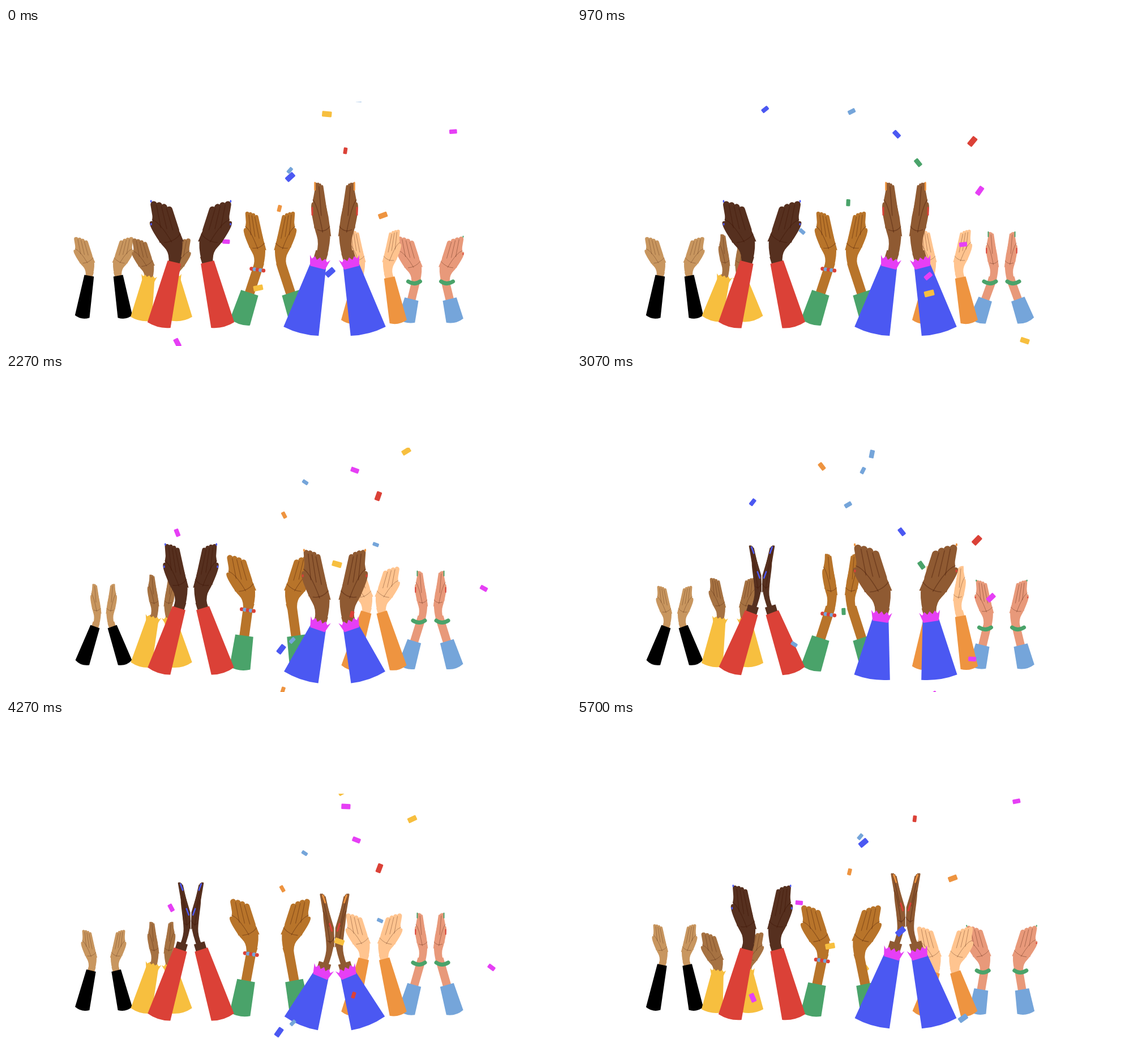
These frames come from a looping animation (998 px wide and 561 px high, 5730 ms). An HTML page with a canvas:

```html
<!DOCTYPE html>
<html lang="en">
<head>
<meta charset="utf-8">
<title>Clapping hands</title>
<style>
html, body { margin: 0; overflow: hidden; background: #fff; }
canvas { display: block; }
</style>
</head>
<body>
<canvas id="stage" width="998" height="561"></canvas>
<script>
const ctx = document.getElementById('stage').getContext('2d');
const LOOP = 5730, CYCLE = 24, CONFETTI_TOP = 130;
const C = {
  black: '#000', yellow: '#f7bf3f', red: '#db4137', green: '#4aa36a', blue: '#4b58f2',
  orange: '#ee9440', sky: '#75a5da', pink: '#e63ff5'
};

// A clap has six poses: 0 touches, 3 is widest. Each rule gives the pose for a step of the cycle.
const quick = start => n => (n + start) % 6;
const slow = n => Math.floor(4.2 + 0.75 * n) % 6;
const uneven = n => Math.floor(3.9 + 0.75 * n - 2 * Math.sin(Math.PI * n / CYCLE)) % 6;

// base: sleeve bottom; cover: share of the forearm in the sleeve; reach: sideways swing;
// wrist height bobs around `mid` by `bob`, lowest at step `low`.
const pairs = [
  { skin: '#c8965f', sleeve: C.black, centre: 172.5, size: 75, base: [134.5, 510], hem: 26, top: 17, cover: 1,
    pose: quick(3), reach: 14, mid: 437, bob: 10, low: 3 },
  { skin: '#a67242', sleeve: C.yellow, centre: 274.5, size: 80, base: [238.5, 514], hem: 38, top: 22, cover: 0.98,
    pose: slow, reach: 14, mid: 442, bob: 8, low: -2.5, frill: C.yellow },
  { skin: '#e8997a', sleeve: C.sky, centre: 750, size: 89, base: [707, 517], hem: 31, top: 25, cover: 0.57,
    pose: slow, reach: 17, mid: 437, bob: 14, low: 1, nails: [C.green, C.red], band: true },
  { skin: '#ffc48f', sleeve: C.orange, centre: 650, size: 88, base: [607, 519], hem: 31, top: 19, cover: 1,
    pose: quick(5), gap: 18, reach: -18, mid: 433, bob: 13, low: -1.9 },
  { skin: '#b8742a', sleeve: C.green, centre: 466.5, size: 104, base: [413, 520], hem: 37, top: 32, cover: 0.55,
    pose: quick(5), reach: 23, mid: 416, bob: 8, low: 0.5, beads: true },
  { skin: '#56301f', sleeve: C.red, centre: 326.5, size: 118, base: [270, 525], hem: 42, top: 24, cover: 1,
    pose: uneven, reach: 11, mid: 405, bob: 16, low: 2, nails: [C.blue, C.blue] },
  { skin: '#8f5a32', sleeve: C.blue, centre: 580.5, size: 135, base: [521, 536], hem: 64, top: 29, cover: 0.91,
    pose: quick(1), reach: 22, mid: 424, bob: 18, low: 5, nails: [C.orange, C.red], frill: C.pink }
];

// Left hand key points in hundredths of its height: [x, y] seen from the side, [x, y] fully open.
const HAND = {
  wristL: [-8, 6, -8, 6], heelL: [0, -22, -9, -15], thumbBase: [-6, -42, -23, -28],
  thumbTip: [-10, -70, -41, -57], notch: [-7, -79, -35, -62], tipL: [-4, -101, -37, -91],
  tipR: [5, -97, -4, -80], knuckle: [12, -56, 4, -53], heelR: [15, -30, 14, -31], wristR: [8, 6, 8, 6]
};

let seed = 11;
function random() {
  seed = (seed * 16807) % 2147483647;
  return seed / 2147483647;
}
const confetti = Array.from({ length: 36 }, (_, i, all = 36) => {
  const x = 520 + (random() + random() - 1) * 320;
  return {
    x, birth: (i + random()) * CYCLE / all, drift: (x - 520) * 0.04 + random() * 8 - 4,
    color: Object.values(C)[1 + Math.floor(random() * 7)],
    size: 11 + random() * 7, angle: random() * 180, behind: i % 3 === 0
  };
});

const mix = (a, b, f) => a.map((v, i) => v + (b[i] - v) * f);

function line(points, color, width, cap = 'round') {
  ctx.beginPath();
  points.forEach(p => ctx.lineTo(...p));
  ctx.strokeStyle = color;
  ctx.lineWidth = width;
  ctx.lineCap = cap;
  ctx.stroke();
}

function curve(from, bend, to, color, width) {
  ctx.beginPath();
  ctx.moveTo(...from);
  ctx.quadraticCurveTo(...bend, ...to);
  ctx.strokeStyle = color;
  ctx.lineWidth = width;
  ctx.lineCap = 'round';
  ctx.stroke();
}

function fill(points, color, smooth) {
  ctx.beginPath();
  points.forEach((p, i) => {
    if (smooth) ctx.quadraticCurveTo(...p, ...mix(p, points[(i + 1) % points.length], 0.5));
    else ctx.lineTo(...p);
  });
  ctx.fillStyle = color;
  ctx.fill();
}

// open: 0 side view to 1 palm view; touch: 1 when the palms meet and the hand bends outwards.
function handPoints([x, y], size, open, touch) {
  const place = ([sx, sy, ox, oy]) => {
    const [px, py] = mix([sx, sy], [ox, oy], open);
    const bent = px * (1 - 0.45 * touch) + 8.5 * touch * Math.sin(-py / 100 * Math.PI);
    return [x + bent * size / 100, y + py * size / 100];
  };
  return Object.fromEntries(Object.entries(HAND).map(([name, key]) => [name, place(key)]));
}

function drawHand({ skin, size, nails }, wrist, open, touch) {
  const p = handPoints(wrist, size, open, touch);
  const crease = 'rgba(60,18,0,.36)', thin = size * 0.011;
  const width = Math.hypot(p.tipR[0] - p.tipL[0], p.tipR[1] - p.tipL[1]) / 3.4;
  const finger = (f, drop) => {
    const [tx, ty] = mix(p.tipL, p.tipR, f);
    const root = mix(mix(p.notch, p.knuckle, f), mix(p.thumbBase, p.heelR, f), 0.3);
    return [[tx, ty + drop - Math.sin(f * Math.PI) * size * 0.02], root];
  };
  const tips = [0.13, 0.38, 0.62, 0.87].map(f => finger(f, width / 2));
  fill([p.wristL, p.heelL, p.thumbBase, p.thumbTip, p.notch, p.knuckle, p.heelR, p.wristR], skin, true);
  fill([p.thumbBase, p.notch, tips[0][0], tips[3][0], p.knuckle, p.heelR], skin);
  tips.forEach(t => line(t, skin, width));

  for (const f of open > 0.3 ? [0.26, 0.5, 0.74] : [0.5]) line(finger(f, size * 0.05), crease, thin);
  curve(p.notch, mix(p.notch, p.knuckle, 0.3), mix(p.thumbBase, p.heelR, 0.5), crease, thin);
  curve(mix(p.thumbBase, p.heelR, 0.2), mix(p.thumbBase, p.heelR, 0.6), mix(p.knuckle, p.heelR, 0.5), crease, thin);

  if (!nails) return;
  const length = size * (0.015 + 0.09 * Math.max(0, 1 - 2 * open));
  const nail = ([x, y], color) => line([[x, y], [x + touch * 4, y + length]], color, size * 0.022);
  nail(mix(p.tipL, p.tipR, touch * 0.5), nails[0]);
  nail(mix(p.thumbTip, p.knuckle, 0.1 + touch * 0.5), nails[1]);
}

function drawSleeve({ base, hem, top, cover, sleeve, frill, size }, wrist) {
  const dx = wrist[0] - base[0], dy = wrist[1] - base[1];
  const end = -Math.hypot(dx, dy) * cover;
  ctx.save();
  ctx.translate(...base);
  ctx.rotate(Math.atan2(dx, -dy));
  ctx.fillStyle = sleeve;
  ctx.beginPath();
  ctx.moveTo(-top / 2, end);
  ctx.lineTo(top / 2, end);
  ctx.lineTo(hem / 2, -1);
  ctx.quadraticCurveTo(0, 6, -hem / 2, -1);
  ctx.fill();
  if (frill) {
    const w = top * 0.64, h = size * 0.115;
    const teeth = Array.from({ length: 9 }, (_, k) => [w * (k / 4 - 1), end - h * (k % 2 ? 0.65 : 1)]);
    fill([[top * 0.47, end + 3], [-top * 0.47, end + 3], ...teeth], frill);
  }
  ctx.restore();
}

function drawArm(pair, wrist, pose, mirrored) {
  const { base, size, cover, skin } = pair, [x, y] = wrist;
  const open = Math.sin(Math.PI * (pose - 0.5) / 6) ** 2;
  line([mix(base, wrist, cover * 0.9), wrist, [x + size * 0.03, y - size * 0.1]], skin, size * 0.165, 'butt');
  drawHand(pair, wrist, open, pose ? 0 : 1);
  drawSleeve(pair, wrist);
  if (pair.band) curve([x - 13, y - 2], [x - 2, y + 5], [x + 8, y - 2], C.green, 7);
  if (pair.beads && !mirrored) {
    for (let k = 0; k < 5; k++) {
      const bead = [x - 11 + k * 5.3, y + 1 + k * 0.8];
      line([bead, bead], k % 2 ? C.sky : C.red, 6.8);
    }
  }
}

function drawPair(pair, n) {
  const pose = pair.pose(n);
  const spread = Math.sin(Math.PI * pose / 6) ** 2;
  const wrist = [
    pair.centre - 0.155 * pair.size - (pair.gap || 0) - pair.reach * spread,
    pair.mid + pair.bob * Math.cos((n - pair.low) * Math.PI / 6)
  ];
  drawArm(pair, wrist, pose, false);
  ctx.save();
  ctx.translate(2 * pair.centre, 0);
  ctx.scale(-1, 1);
  drawArm(pair, wrist, pose, true);
  ctx.restore();
}

function drawConfetti(n, behind) {
  ctx.save();
  ctx.beginPath();
  ctx.rect(0, CONFETTI_TOP, 998, 561);
  ctx.clip();
  for (const c of confetti.filter(c => c.behind === behind)) {
    const age = (n - c.birth + CYCLE) % CYCLE;
    ctx.save();
    ctx.translate(c.x + c.drift * age, CONFETTI_TOP - 10 + 35 * age + 1.9 * age * age);
    ctx.rotate((c.angle + c.drift * 0.6 * age) * Math.PI / 180);
    ctx.fillStyle = c.color;
    ctx.beginPath();
    ctx.roundRect(-c.size / 2, -c.size * 0.29, c.size, c.size * 0.58, 1.5);
    ctx.fill();
    ctx.restore();
  }
  ctx.restore();
}

function draw(now) {
  // Drawings change 12.5 times a second, shown on a grid of 30 a second.
  const tick = Math.floor((now % LOOP) * 0.03 + 0.15);
  const n = Math.floor(tick / 2.4 + 1e-6) % CYCLE;
  ctx.clearRect(0, 0, 998, 561);
  pairs.slice(0, 4).forEach(pair => drawPair(pair, n));
  drawConfetti(n, true);
  pairs.slice(4).forEach(pair => drawPair(pair, n));
  drawConfetti(n, false);
}

const start = performance.now();
function loop() {
  draw(performance.now() - start);
  requestAnimationFrame(loop);
}
loop();
</script>
</body>
</html>
```
